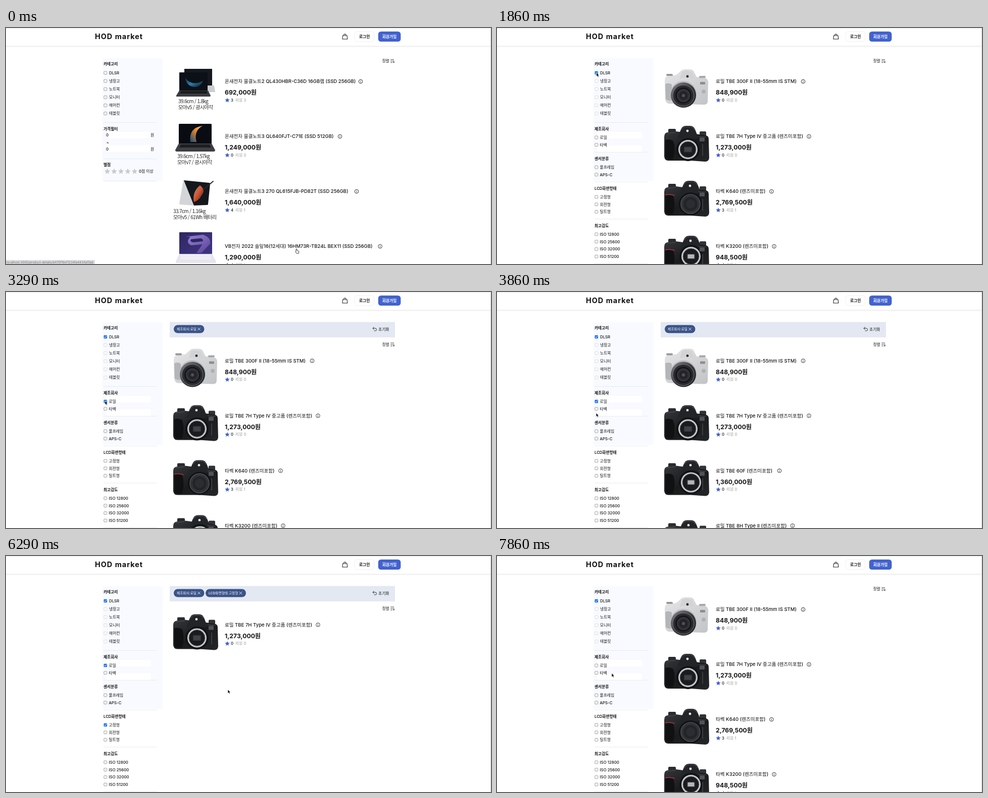
An HTML page that plays this animation: 960x468 px, repeating every 8000 ms.

```html
<!DOCTYPE html>
<html lang="ko">
<head>
<meta charset="utf-8">
<title>HOD market</title>
<style>
  html, body { margin: 0; width: 100%; height: 100%; overflow: hidden; background: #fff; }
  svg { display: block; width: 960px; height: 468px; font-family: Inter, "Noto Sans CJK KR", "Noto Sans CJK", sans-serif; }
  text { white-space: pre; }
  .caption { font-family: "Noto Sans CJK KR", "Noto Sans CJK", sans-serif; letter-spacing: -.7px; }
</style>
</head>
<body>
<svg viewBox="0 0 960 468">
  <defs>
    <linearGradient id="swoosh" x2="1" y2="1"><stop stop-color="#0a1622"/><stop offset=".5" stop-color="#2f7fae"/><stop offset="1" stop-color="#07101a"/></linearGradient>
    <linearGradient id="ember" x1="1" x2="0" y2="1"><stop stop-color="#f6d08a"/><stop offset=".4" stop-color="#ee8a24"/><stop offset="1" stop-color="#174a7c"/></linearGradient>
    <linearGradient id="petal" y2="1" x2="1"><stop stop-color="#39b7a6"/><stop offset=".45" stop-color="#e2532f"/><stop offset="1" stop-color="#15302f"/></linearGradient>
    <linearGradient id="violet" x2="1" y2="1"><stop stop-color="#2d2661"/><stop offset="1" stop-color="#413683"/></linearGradient>
    <linearGradient id="ribbon" x2="1" y2="1"><stop stop-color="#9a83d6"/><stop offset="1" stop-color="#574397"/></linearGradient>
    <linearGradient id="black" x2="1" y2="1"><stop stop-color="#36373b"/><stop offset=".5" stop-color="#1a1b1d"/><stop offset="1" stop-color="#252629"/></linearGradient>
    <linearGradient id="white" x2="1" y2="1"><stop stop-color="#e6e6e7"/><stop offset="1" stop-color="#c2c3c6"/></linearGradient>
    <linearGradient id="barrel" x2="1" y2="1"><stop stop-color="#85868b"/><stop offset=".5" stop-color="#3a3b40"/><stop offset="1" stop-color="#1c1d20"/></linearGradient>
    <radialGradient id="glass"><stop stop-color="#67636f"/><stop offset=".4" stop-color="#1d1d22"/><stop offset="1" stop-color="#3a3b41"/></radialGradient>
  </defs>
  <g id="header"></g>
  <g id="view"></g>
  <g id="pointer"></g>
</svg>
<script>
const LOOP = 8000, ROW = 109;
const $ = id => document.getElementById(id);

// Text is placed by its left edge and vertical middle.
const text = (x, y, s, size = 7.8, weight = 500, fill = '#151515', extra = '') =>
  `<text x="${x}" y="${y + size * .36}" font-size="${size}" font-weight="${weight}" fill="${fill}" ${extra}>${s}</text>`;
const rect = (x, y, w, h, fill, rx = 0, extra = '') =>
  `<rect x="${x}" y="${y}" width="${w}" height="${h}" rx="${rx}" fill="${fill}" ${extra}/>`;
const disc = (x, y, r, fill, extra = '') => `<circle cx="${x}" cy="${y}" r="${r}" fill="${fill}" ${extra}/>`;
const shape = (d, fill, extra = '') => `<path d="${d}" fill="${fill}" ${extra}/>`;
const line = (d, color = '#222', width = 1) =>
  shape(d, 'none', `stroke="${color}" stroke-width="${width}" stroke-linecap="round" stroke-linejoin="round"`);
const rule = y => rect(193, y, 106, .8, '#e4e6ea');

function star(x, y, r, fill) {
  const points = Array.from({ length: 10 }, (_, i) => {
    const a = i * Math.PI / 5, q = i % 2 ? r * .45 : r;
    return (x + q * Math.sin(a)).toFixed(2) + ',' + (y - q * Math.cos(a)).toFixed(2);
  });
  return `<polygon points="${points.join(' ')}" fill="${fill}"/>`;
}

const caption = (x, a, b) => [a, b].map((s, i) =>
  text(x, 145.5 + 12 * i, s, 10.1, 500, '#2c2c2c', 'class="caption"')).join('');

// Product pictures, drawn for the first row of the list.
const pictures = {
  duo: () =>
    shape('M353 81h55v37h-55z', '#15181d') + shape('M397 114h15l2 13h-14z', '#c9ccd1') +
    rect(343, 88, 56, 37, '#0c1118', 1) + shape('M354 97q12 20 36 8q-8 17-25 10q-9-5-11-18z', 'url(#swoosh)') +
    shape('M343 124h57l5 10q0 2-2 2h-64q-3 0-2-2z', '#3b3c40') + shape('M346 125h51l2 5h-55z', '#1b1c20') +
    caption(341, '39.6cm / 1.8kg', '모아v5 / 광시야각'),
  solo: () =>
    rect(342, 81, 65, 40, '#090c12', 1.5) +
    shape('M365 117q-4-28 24-32q-18 10-12 32z', 'url(#ember)') +
    shape('M342 120h65l7 13q0 3-3 3h-73q-3 0-3-3z', '#3f4043') + shape('M346 122h57l3 6h-63z', '#1d1e21') +
    caption(339, '39.6cm / 1.57kg', '모아v7 / 광시야각'),
  tent: () =>
    shape('M351 84l-8 46q0 2 2 2l27 2l3-45z', '#d4d5d8') +
    shape('M352 84l50 5q2 0 2 2l-4 40q0 2-3 2l-25 1z', '#14181c') +
    shape('M372 127q-4-20 12-33q12 9 3 20q-5 10-15 13z', 'url(#petal)') +
    line('M410 86L391 102', '#26282c', 2) +
    caption(331, '33.7cm / 1.16kg', '모아v5 / 61Wh 배터리'),
  slim: () =>
    rect(343, 78, 65, 43, 'url(#violet)', 1) +
    shape('M355 87l35-4q16 5 14 18l-17 18h-10l12-17l-22 2q-13-5-2-17z', 'url(#ribbon)') +
    shape('M366 92l20-2q6 3 3 6l-18 2q-8-1-5-6z', '#2d2661') +
    shape('M343 121h65l8 15q0 3-3 3h-75q-3 0-2-3z', '#e6e5ee') +
    [124, 127.5, 131].map(y => line(`M346 ${y}h59`, '#f9f9fc', 1.4)).join(''),
  pale: () =>
    shape('M332 104q0-8 6-9l17-2l8-7q3-4 9-4h9q7 0 9 5l5 10l16 2q7 1 7 9l-1 37q0 7-7 7l-69-2q-7 0-8-9z', 'url(#white)') +
    rect(335, 91, 13, 4, '#97989c', 2) + rect(400, 95, 13, 4, '#a6a7ab', 2) +
    shape('M362 101l4-14q9-5 19 0l6 15q-14-6-29-1z', '#d2d3d5') + disc(377, 96, 2.4, '#222') +
    shape('M333 111q8-3 13 1v31q-6 3-12-2z', '#b4b5b8') + rect(402, 107, 10, 5, '#8d8e92', 1) + disc(409, 126, 4, '#b0b1b4') +
    disc(369, 131, 26, '#bcbdc0') + disc(369, 133, 25, 'url(#barrel)') + disc(369, 134, 21, '#2a2b2f', 'stroke="#77787d"') +
    disc(369, 134, 16, '#141518') + disc(369, 134, 13, 'url(#glass)'),
  full: () => camera(378, 132, 19),
  capped: () => camera(383, 131, 19, { cap: true, red: true }),
  mirror: () => camera(384, 126, 19, { red: true, pane: '#b4b6b8' }),
  wide: () => camera(384, 129, 20, { pane: '#b4b6b8' }),
  compact: () => `<g transform="translate(0 10)">${camera(380, 129, 18)}</g>`
};

function camera(x, y, r, { cap, red, pane = '#3f4247' } = {}) {
  const mount = cap
    ? disc(x, y, r, '#303136', 'stroke="#5b5c62" stroke-width="1.2"') + disc(x, y, r - 4, '#232428', 'stroke="#3b3c41"') + disc(x, y, r - 10, '#2c2d31')
    : disc(x, y, r, '#c9cbce') + disc(x, y, r - 3, '#1a1b1e', 'stroke="#77797e"') +
      rect(x - 8, y - 5.500, 16, 11, '#34363b', 1) + rect(x - 6.500, y - 4, 13, 8, pane, 1);
  return rect(339, 91, 15, 10, '#2a2b2f', 2) + rect(401, 96, 13, 10, '#313236', 2) +
    shape('M331 107q0-8 6-9l17-2l46 6l13 2q6 1 6 7l1 38q-1 7-8 7l-28-2h-45q-7 0-8-8z', 'url(#black)') +
    shape(`M${x - 21} 110l7-18q3-7 10-7h8q7 0 10 7l7 18z`, '#232427') +
    line(`M${x - 13} 93q3-6 9-6h8q6 0 9 6`, '#505157', 1.2) +
    line('M336 100l17-2M399 106l15 1', '#4c4d52', 1.2) +
    shape('M333 113q9-3 16 2q5 15 0 35q-8 3-15-1z', '#101113') +
    (red ? line('M333 113q10-2 18 1', '#b5333a', 1.5) : '') +
    disc(x, y, r + 4, '#121315') + mount +
    rect(401, 108, 10, 8, '#515257', 1) + line('M407 122v22', '#3c3d41', 2) + disc(x - 1, 95, 2.4, '#eee');
}

// [picture, title, price, score, reviews, info icon x]
const notebooks = [
  ['duo', '온새전자 물결노트2 QL430HBR-C36D 16GB램 (SSD 256GB)', '692,000', 3, 3, 702],
  ['solo', '온새전자 물결노트3 QL640FJT-C71E (SSD 512GB)', '1,249,000', 0, 0, 661],
  ['tent', '온새전자 물결노트3 270 QL615FJB-PD82T (SSD 256GB)', '1,640,000', 4, 1, 694],
  ['slim', 'VB전자 2022 솔잎16(12세대) 16HM73R-TB24L BEX11 (SSD 256GB)', '1,290,000', 4, 1, 740.5]
];
const cameras = [
  ['pale', '로밀 TBE 300F II (18-55mm IS STM)', '848,900', 0, 0, 606],
  ['full', '로밀 TBE 7H Type IV 중고품 (렌즈미포함)', '1,273,000', 0, 0, 617.5],
  ['capped', '타벡 K640 (렌즈미포함)', '2,769,500', 3, 1, 543.5],
  ['mirror', '타벡 K3200 (렌즈미포함)', '948,500', 4, 1, 548.5]
];
const oneBrand = [cameras[0], cameras[1],
  ['wide', '로밀 TBE 60F (렌즈미포함)', '1,360,000', 0, 0, 559],
  ['compact', '로밀 TBE 8H Type II (렌즈미포함)', '1,150,000', 0, 0, 585]];
const fixedScreen = [cameras[1]];

const product = ([pic, title, price, score, reviews, info], y) => `<g transform="translate(0 ${y})">` +
  pictures[pic]() + text(433, 106, title, 9.55) +
  disc(info, 106, 3.8, 'none', 'stroke="#222" stroke-width=".9"') +
  line(`M${info} 105.8v2M${info} 104v.1`, '#222', .9) +
  text(433, 127.8, price + '원', 12.2, 700) + star(438, 143.3, 5, '#3f61cf') +
  text(445, 143.3, score) + text(454, 143.3, '리뷰 ' + reviews, 7.8, 400, '#999') + '</g>';

const check = (y, on, off) => on
  ? rect(193.5, y - 3.3, 6.6, 6.6, '#1a73e8', 1.2) + line(`M195 ${y + .1}l1.3 1.5l2.5-3.1`, '#fff', 1)
  : rect(193.9, y - 2.9, 5.8, 5.8, '#fff', 1, `stroke="${off ? '#d4d4d4' : '#858585'}" stroke-width=".8"`);

const groups = [
  [200, '제조회사', ['로밀', '타벡']],
  [259, '센서분류', ['풀프레임', 'APS-C']],
  [318, 'LCD화면형태', ['고정형', '회전형', '틸트형']],
  [392, '최고감도', ['ISO 12800', 'ISO 25600', 'ISO 32000', 'ISO 51200']]
];

function sidebar(s) {
  let out = rect(191, 60, 119, 243, '#f8faff') + rect(198, 206, 89, 13, '#fff') + rect(198, 233, 89, 13, '#fff') +
    text(193, 71.5, '카테고리', 7.7, 600) + rule(187);
  ['DLSR', '냉장고', '노트북', '모니터', '에어컨', '태블릿'].forEach((name, i) => {
    const y = 89 + 16.1 * i;
    out += check(y, s.dslr && !i, s.details && i) + text(204, y, name);
  });
  if (s.details) {
    for (const [top, name, items] of groups) {
      out += text(193, top, name, 7.7, 600);
      items.forEach((item, i) => {
        const y = top + 17 + 14.7 * i;
        out += check(y, s.checked.includes(item)) + text(203.5, y, item);
      });
      out += rule(top + 17 + 14.7 * items.length - .6);
    }
    return out;
  }
  out += text(193, 200, '가격필터', 7.7, 600) + text(199, 227, '~');
  for (const y of [212.5, 240.5]) out += text(198, y, '0') + text(286, y, '원');
  out += rule(259) + text(193, 271.5, '별점', 7.7, 600);
  for (let i = 0; i < 5; i++) out += star(200.5 + 13.5 * i, 284.5, 6, '#c9c9c9');
  return out + text(263, 284.5, '0점 이상') + rule(303);
}

const chip = (x, w, label) => rect(x, 65.5, w, 16, '#3a5388', 8) + text(x + 6, 73.5, label, 6.7, 500, '#fff') +
  line(`M${x + w - 13} 71l5 5m0-5l-5 5`, '#fff', .9);

function content(s) {
  const shift = s.bar ? 30.4 : 0, sortY = s.bar ? 104 : 65.5;
  let out = s.list.map((p, i) => product(p, shift + ROW * i)).join('');
  if (s.bar) {
    out += rect(324, 59.5, 446, 30.5, '#e3e8f2') + chip(332, 60.5, '제조회사:로밀') +
      line('M728.5 69.5l-2.5 2.5l2.5 2.5M726 72h5q2.5 0 2.5 2.5t-2.5 2.5h-2', '#222', .9) +
      text(737, 74, '초기화');
    if (s.checked.length > 1) out += chip(395, 80, 'LCD화면형태:고정형');
  }
  return out + text(744.5, sortY, '정렬', 7.7) +
    line(`M761.5 ${sortY - 3}h6M761.5 ${sortY}h4M761.5 ${sortY + 3}h3M767.5 ${sortY - 1}v4.5m-1.5-1.5l1.5 1.5l1.5-1.5`, '#222', .8);
}

function stateAt(t) {
  const bar = t >= 3000 && t < 7290;
  return {
    bar,
    dslr: t >= 1570,
    details: t >= 1860,
    checked: !bar ? [] : t >= 4860 ? ['로밀', '고정형'] : ['로밀'],
    list: t < 1860 ? notebooks : t < 3430 || t >= 7720 ? cameras : t < 5290 ? oneBrand : fixedScreen
  };
}

const path = [
  [0, 573, 438], [1140, 197, 89], [1860, 197, 89], [2570, 196, 212], [3000, 196, 212], [3140, 196, 216],
  [3570, 196, 216], [4570, 197, 334], [5290, 197, 334], [5860, 433, 320], [6150, 433, 320],
  [6290, 439, 265], [7000, 744, 73], [7290, 744, 73], [7860, 227, 232.5], [LOOP, 227, 232.5]
];
function pointerAt(t) {
  const i = Math.max(1, path.findIndex(p => p[0] >= t));
  const [a, ax, ay] = path[i - 1], [b, bx, by] = path[i];
  const k = (t - a) / (b - a), e = k * k * (3 - 2 * k);
  return [ax + (bx - ax) * e, ay + (by - ay) * e];
}
const arrow = shape('M0 0v7.2l1.7-1.5l1.3 2.7l1.3-.6l-1.2-2.6h2.2z', '#000', 'stroke="#fff" stroke-width=".6"');
const hand = shape('M2 0q1 0 1 1v2.5l3 .7q1 .3 .8 1.5l-.6 3.3h-4l-2.2-3.2q0-1 1-.6V1q0-1 1-1z', '#fff', 'stroke="#111" stroke-width=".8"');

$('header').innerHTML = rect(0, 0, 960, 37, '#fff') + rect(0, 0, 960, .8, '#e2e2e2') +
  rect(0, 35.5, 960, 1, '#e3e3e5') + rect(0, 36.5, 960, 1.5, '#f5f5f6') + rect(959, 0, 1, 468, '#cfcfcf') +
  text(176, 17.3, 'HOD market', 14.4, 700, '#111', 'letter-spacing="1"') +
  line('M666.5 15h8.6l.6 7h-9.8zM668.6 15v-.6q0-2.4 2.2-2.4t2.2 2.4v.6', '#222', 1.1) +
  rect(690.5, 7, 38, 20, '#fff', 5, 'stroke="#f0f0f2"') + text(699, 17, '로그인', 7.7, 600) +
  rect(736.7, 7, 44.6, 20, '#4262cf', 5.5) + text(744.8, 17, '회원가입', 7.7, 600, '#fff');

function draw(t) {
  const s = stateAt(t), [x, y] = pointerAt(t);
  const rowsTop = s.bar ? 105 : 75;
  const overRow = x > 324 && y > rowsTop && y < rowsTop + ROW * s.list.length;
  const overReset = s.bar && x > 722 && y < 85;
  const status = t < 570 ? rect(0, 460, 176, 8, '#dcdde0') +
    text(1, 464.5, 'localhost:3000/product-details/6470f16ef1234fa4434a15ab', 6.1, 400, '#777') : '';
  $('view').innerHTML = sidebar(s) + content(s) + status;
  $('pointer').innerHTML = `<g transform="translate(${x} ${y})">${overRow || overReset ? hand : arrow}</g>`;
}

let shown = -1;
function tick() {
  const step = Math.floor((performance.now() % LOOP + 5) * 7 / 1000) % 56;
  if (step !== shown) draw(Math.round((shown = step) * 100 / 7) * 10);
  requestAnimationFrame(tick);
}
tick();
</script>
</body>
</html>
```
